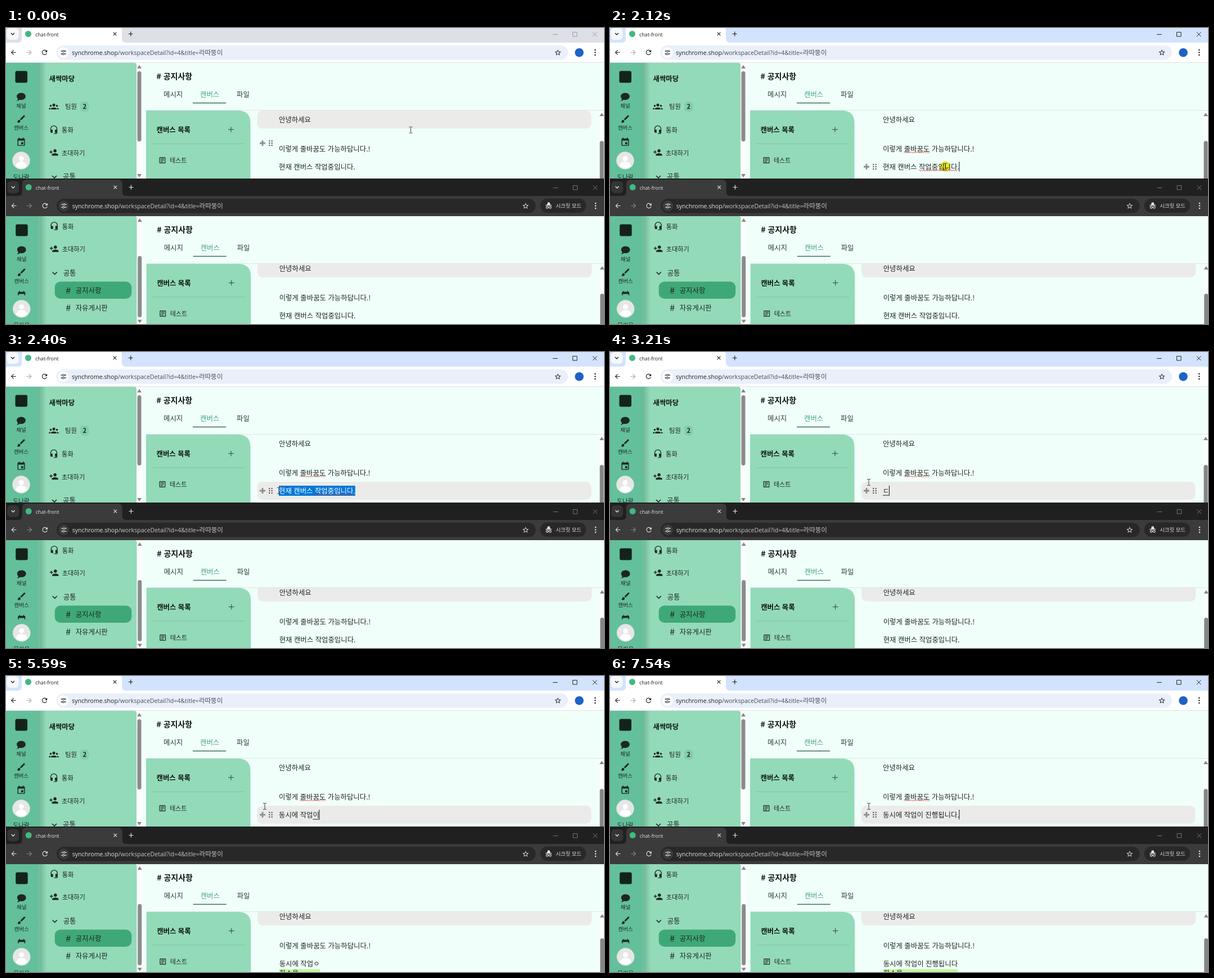
An HTML page for the animation above (8000 ms loop, 1063 by 527 pixels).

```html
<!DOCTYPE html>
<html lang="ko">
<head>
<meta charset="utf-8">
<title>chat-front</title>
<style>
html, body { margin: 0; width: 100%; height: 100%; overflow: hidden; background: #f1fffa; }
svg { display: block; width: 1063px; height: 527px; }
text { font-family: "Noto Sans CJK KR", "Noto Sans KR", "Noto Sans CJK JP", sans-serif; white-space: pre; }
.ui { font-family: "Open Sans", "Noto Sans", sans-serif; }
.mul { mix-blend-mode: multiply; }
</style>
</head>
<body>
<svg id="stage" viewBox="0 0 1063 527" xmlns="http://www.w3.org/2000/svg"></svg>
<script>
const LOOP = 8000, SIZE = 12.4, INK = '#1d2623', MINT = '#93dab9';
const OLD = '현재 캔버스 작업중입니다.';

const ICON = {
  back: 'M20 11H7.83l5.59-5.59L12 4l-8 8 8 8 1.41-1.41L7.83 13H20v-2z',
  reload: 'M17.65 6.35A8 8 0 1 0 19.73 14h-2.08A6 6 0 1 1 12 6c1.66 0 3.14.69 4.22 1.78L13 11h7V4l-2.35 2.35z',
  chat: 'M12 3C6.5 3 2 6.58 2 11c0 2.13 1.05 4.07 2.75 5.5 0 .6-.42 2.17-2.75 4.5 2.37-.11 4.64-1 6.47-2.5 1.14.33 2.34.5 3.53.5 5.5 0 10-3.58 10-8s-4.5-8-10-8',
  brush: 'M7 14c-1.66 0-3 1.34-3 3 0 1.31-1.16 2-2 2 .92 1.22 2.49 2 4 2 2.21 0 4-1.79 4-4 0-1.66-1.34-3-3-3zm13.71-9.37l-1.34-1.34c-.39-.39-1.02-.39-1.41 0L9 12.25 11.75 15l8.96-8.96c.39-.39.39-1.02 0-1.41z',
  event: 'M17 12h-5v5h5v-5zM16 1v2H8V1H6v2H5c-1.11 0-2 .9-2 2v14c0 1.1.89 2 2 2h14c1.1 0 2-.9 2-2V5c0-1.1-.9-2-2-2h-1V1h-2zm3 18H5V8h14v11z',
  headset: 'M12 1a9 9 0 0 0-9 9v7a3 3 0 0 0 3 3h3v-8H5v-2a7 7 0 0 1 14 0v2h-4v8h4v1h-7v2h6a3 3 0 0 0 3-3V10a9 9 0 0 0-9-9z',
  invite: 'M15 12c2.21 0 4-1.79 4-4s-1.79-4-4-4-4 1.79-4 4 1.79 4 4 4zm-9-2V7H4v3H1v2h3v3h2v-3h3v-2H6zm9 4c-2.67 0-8 1.34-8 4v2h16v-2c0-2.66-5.33-4-8-4z',
  team: 'M8.5 8a3.5 3.5 0 1 0 7 0a3.5 3.5 0 1 0-7 0M5 19v-1.5c0-2 3.1-3.5 7-3.5s7 1.5 7 3.5V19zM2 10a2.5 2.5 0 1 0 5 0a2.5 2.5 0 1 0-5 0M17 10a2.5 2.5 0 1 0 5 0a2.5 2.5 0 1 0-5 0M0 19v-1.5c0-1.4 1.9-2.6 4.5-2.9-.6.7-1 1.7-1 2.7V19zM24 19v-1.5c0-1.4-1.9-2.6-4.5-2.9.6.7 1 1.7 1 2.7V19z',
  note: 'M5 3h14a2 2 0 0 1 2 2v14a2 2 0 0 1-2 2H5a2 2 0 0 1-2-2V5a2 2 0 0 1 2-2zM5 5v14h14V5zM7 7h10v2H7zM7 11h10v2H7zM7 15h7v2H7z',
  star: 'M22 9.24l-7.19-.62L12 2 9.19 8.63 2 9.24l5.46 4.73L5.82 21 12 17.27 18.18 21l-1.63-7.03L22 9.24zM12 15.4l-3.76 2.27 1-4.28-3.32-2.88 4.38-.38L12 6.1l1.71 4.04 4.38.38-3.32 2.88 1 4.28L12 15.4z'
};

const icon = (name, cx, cy, size, fill = INK, flip = 1) =>
  `<path d="${ICON[name]}" fill="${fill}" fill-rule="${name === 'note' || name === 'star' ? 'evenodd' : 'nonzero'}" transform="translate(${cx} ${cy}) scale(${flip * size / 24} ${size / 24}) translate(-12 -12)"/>`;
const box = (x, y, w, h, fill, r = 0, more = '') =>
  `<rect x="${x}" y="${y}" width="${w}" height="${h}" rx="${r}" fill="${fill}" ${more}/>`;
const dot = (x, y, r, fill, more = '') => `<circle cx="${x}" cy="${y}" r="${r}" fill="${fill}" ${more}/>`;
const line = (d, color, w = 1, more = '') => `<path d="${d}" fill="none" stroke="${color}" stroke-width="${w}" ${more}/>`;
// Hangul text, placed by its vertical middle
const txt = (x, mid, s, size = SIZE, fill = INK, weight = 400, more = '') =>
  `<text x="${x}" y="${mid + size * .37}" font-size="${size}" fill="${fill}" font-weight="${weight}" ${more}>${s}</text>`;
const cross = (x, y, r, color, w) => line(`M${x - r} ${y}h${2 * r}M${x} ${y - r}v${2 * r}`, color, w);
const ex = (x, y, r, color) => line(`M${x - r} ${y - r}l${2 * r} ${2 * r}m0 ${-2 * r}l${-2 * r} ${2 * r}`, color, 1.1);
const chevron = (x, y, r, color, w) => line(`M${x - r} ${y - r / 2}l${r} ${r}l${r} ${-r}`, color, w);
const arrow = (x, y, up) => `<path d="M${x - 4} ${y + 3 * up}h8l-4 ${-6 * up}z" fill="#858585"/>`;
const wave = (x, y, w) => line(`M${x} ${y}q1 -2.4 2 0` + 't2 0'.repeat(Math.round(w / 2) - 1), '#e2382f', .9);
const grip = y => [201, 205, 209].map(v => dot(468.3, v - 205 + y, 1.2, '#555b58') + dot(472.7, v - 205 + y, 1.2, '#555b58')).join('');

function browser(c, id) {
  const pillEnd = c.dark ? 941 : 999, starX = c.dark ? 923 : 981;
  let s = box(-2, -5, 1066, 32, c.bar, 0, `id="bar${id}"`);
  s += box(1.5, 0, 21, 21, c.drop, 6) + chevron(12, 10.5, 3, c.fg, 1.4);
  s += `<path d="M21 26q7 0 7-7V5q0-8 8-8H198q8 0 8 8V19q0 7 7 7z" fill="${c.tool}"/>`;
  s += dot(39.5, 10.5, 5.5, '#41b883');
  s += `<text class="ui" x="52" y="15.3" font-size="9.05" fill="${c.fg}">chat-front</text>`;
  s += ex(193.5, 10.5, 2.8, c.fg) + cross(221.7, 10.5, 4, c.fg, 1.2);
  s += `<g id="ctl${id}" stroke="${c.ctl}" fill="none"><path d="M972 11.5h8.5M1007.500 7.500h7.500v7.500h-7.500zM1043 7.500l7.500 7.500m0-7.500l-7.500 7.500"/></g>`;
  s += box(-2, 26, 1066, 36, c.tool);
  s += icon('back', 13.3, 43.5, 13.5, c.fg) + icon('back', 41, 43.5, 13.5, c.off, -1) + icon('reload', 68.5, 43.5, 14, c.fg);
  s += box(89.5, 31, pillEnd - 89.5, 25.5, c.pill, 12.7) + dot(102, 43.7, 9.5, c.tune);
  s += line('M97.500 41.200h3.500M104 41.200h3M97.500 46.200h2.500M103 46.200h4', c.fg, 1.2);
  s += dot(102.7, 41.2, 1.6, 'none', `stroke="${c.fg}"`) + dot(101.3, 46.2, 1.6, 'none', `stroke="${c.fg}"`);
  s += `<text class="ui" x="117" y="47.5" font-size="10.6" fill="${c.fg}">synchrome.shop<tspan fill="${c.path}">/workspaceDetail?id=4&amp;title=<tspan font-size="11.5" font-weight="300" font-family="Noto Sans CJK KR, sans-serif">라따뚱이</tspan></tspan></text>`;
  s += icon('star', starX, 43.8, 13.5, c.fg);
  if (c.dark) {
    s += box(949, 30.5, 81.500, 25.500, '#282828', 12.700);
    s += `<path d="M961 42l1.200-4.500h3.600l1.200 4.500z" fill="${c.fg}"/>` + line('M958.500 42.600h11', c.fg, 1.2);
    s += [961.3, 966.7].map(x => dot(x, 46.4, 1.8, 'none', `stroke="${c.fg}" stroke-width="1.1"`)).join('') + line('M963 46h2', c.fg);
    s += txt(976.500, 43.200, '시크릿 모드', 9.4, c.fg, 500);
  } else s += dot(1019, 43.7, 7.8, '#1d62c4');
  return s + [39, 43.5, 48].map(y => dot(1047.3, y, 1.3, c.fg)).join('');
}

function page(c, id) {
  let s = box(-2, 61.5, 1066, 270, '#f1fffa');
  // folder panel
  s += `<path d="M58 62H228q4 0 4 4V340H58z" fill="${MINT}"/>`;
  s += `<g clip-path="url(#page)"><g transform="translate(0 ${c.side})">`;
  s += txt(76.5, 90, '새싹마당', SIZE, '#0c1411', 700);
  s += icon('team', 85, 140, 17.5) + txt(105, 140, '팀원', 11.3) + box(132, 131, 15.5, 18, '#84cdab', 6) + txt(139.7, 140, '2', 11, INK, 700, 'text-anchor="middle"');
  s += icon('headset', 85, 181, 16.5) + txt(99, 182, '통화', 11.3);
  s += icon('invite', 85, 221.5, 17) + txt(99, 222.5, '초대하기', 11.2);
  s += chevron(86, 265, 4, INK, 1.6) + txt(101, 264.5, '공통');
  s += box(86, 280, 136.5, 30.5, '#3fa878', 10);
  s += txt(105.5, 295.5, '#', 16) + txt(123, 295.5, '공지사항') + txt(105.5, 326.5, '#', 16) + txt(123, 326.5, '자유게시판');
  s += '</g></g>';
  s += box(232, 62, 10, 280, '#fcfcfc') + arrow(237, 69, 1) + arrow(237, c.downY, -1) + box(233.5, c.thumb[0], 7, c.thumb[1], '#8b8b8b', 3.5);
  // icon rail
  s += box(58, 62, 14, 280, 'url(#shade)') + box(-2, 62, 60, 280, '#63c09a');
  s += box(16.500, 76.500, 21.500, 21, '#13231c', 3);
  s += icon('chat', 27, 122.500, 19) + icon('brush', 27, 162, 18);
  s += txt(27, 138, '채널', 9.6, INK, 400, 'text-anchor="middle"') + txt(27, 177.5, '캔버스', 9.5, INK, 400, 'text-anchor="middle"');
  s += icon('event', 27, 203.300, 17.500) + box(0, c.face - 24, 57, 90, '#63c09a', 0, c.dark ? '' : 'opacity="0"');
  s += dot(27, c.face, 15.700, '#e6e6e6') + dot(27, c.face - 3.5, 4.6, '#fff');
  s += `<path d="M17.500 ${c.face + 10}q0-8 9.500-8t9.500 8q-9.500 8-19 0" fill="#fff"/>`;
  s += txt(27, c.face + 29, c.user, 10.5, INK, 400, 'text-anchor="middle"');
  // header
  s += txt(267.5, 85.5, '# 공지사항', 14, '#0c1411', 700);
  s += txt(280, 118, '메시지', SIZE, '#2d3a35') + txt(345, 118, '캔버스', SIZE, '#45a37e', 500) + txt(410, 118, '파일', SIZE, '#2d3a35');
  s += line('M332 133.500H391', '#3f6d5a', 1.3) + line('M249 146.500H1064', '#d9e6e0');
  // canvas list
  s += `<path d="M249 147H412q22.500 0 22.500 22.500V340H249z" fill="${MINT}"/>`;
  s += txt(267.5, 181, '캔버스 목록', SIZE, '#0c1411', 700) + cross(400, 180.7, 4.8, '#3d5a4e', 1.2);
  s += line('M260 206H424.500', '#7fc3a4') + icon('note', 278, 235.5, 14.5) + txt(291, 236, '테스트', 11, INK, 500);
  // editor
  s += box(1055, 147, 9, 200, '#fbfdfc') + arrow(1059, 154, 1) + box(1055.5, c.bar2, 7, 200, '#858585', 3.5, `id="thumb${id}"`);
  s += `<g clip-path="url(#editor)"><g transform="translate(0 ${c.scroll})">`;
  s += box(446.5, 147, 594, 32, '#ebebea', 9, `id="hello${id}"`);
  if (!c.dark) {
    s += box(446.5, 231, 594, 32, '#ebebea', 9, 'id="focus"');
    s += `<g id="plusA">${cross(456, 205, 5, '#8b918e', 2.8)}</g><g id="plusB">${cross(456, 247, 5, '#8b918e', 2.8)}</g>`;
    s += `<g id="gripA">${grip(205)}</g><g id="gripB">${grip(247)}</g>`;
    s += box(485, 238, 0, 18, '#0078d7', 0, 'id="sel"');
  } else s += box(485.300, 257, 0, 18, '#c0f99b', 0, 'id="tag"') + txt(485.300, 264.500, '한소울', SIZE, INK, 400, 'id="peer"');
  s += txt(485, 163, '안녕하세요') + txt(485, 215, '이렇게 줄바꿈도 가능하답니다.!') + txt(485, 247, OLD, SIZE, INK, 400, `id="text${id}"`);
  if (!c.dark) {
    s += `<g id="waveA">${wave(522.5, 221.5, 45)}</g><g id="waveB">${wave(549, 253.5, 68)}</g>`;
    s += box(485, 254.6, 10, 1, INK, 0, 'id="under"') + box(620, 238, 1, 17.5, '#111', 0, 'id="caret"');
  }
  return s + '</g></g>';
}

const light = { bar: '#dde1e7', drop: '#f6f8fa', tool: '#fff', fg: '#1f2123', off: '#a5a8ab', path: '#4b4f53', ctl: '#979ba0',
  pill: '#e9f0fa', tune: '#fff', side: 0, downY: 263, thumb: [77, 125], face: 236, user: '도나람', bar2: 201, scroll: 0 };
const dark = { dark: true, bar: '#202021', drop: '#353535', tool: '#3b3b3b', fg: '#e2e2e2', off: '#858585', path: '#c4c4c4', ctl: '#777',
  pill: '#282828', tune: '#3b3b3b', side: -101.5, downY: 249.5, thumb: [133, 109], face: 227, user: '문가온', bar2: 200, scroll: -8 };

const $ = id => document.getElementById(id);
$('stage').innerHTML = `<defs>
  <clipPath id="page"><rect x="0" y="62" width="232" height="280"/></clipPath>
  <clipPath id="editor"><rect x="436" y="147" width="618" height="200"/></clipPath>
  <linearGradient id="shade"><stop offset="0" stop-color="#2f7a5a" stop-opacity=".38"/><stop offset="1" stop-color="#2f7a5a" stop-opacity="0"/></linearGradient>
  </defs><g>${page(light, 0)}${browser(light, 0)}${line('M0 61.500H1063', '#dbe3e0')}</g>
  ${box(0, 268, 1063, 259, '#202021')}
  <g transform="translate(.7 273)">${page(dark, 1)}${browser(dark, 1)}</g>
  ${dot(0, 0, 9.3, '#f7e52c', 'id="click" class="mul" opacity=".9"')}
  <g id="mouse">${line('M-3-5.500h2l1 .8 1-.8h2M0-4.700V4.700M-3 5.500h2l1-.8 1 .8h2', '#39413d')}</g>`;

// each move: first step, last step, number of steps, end point
const moves = [[180, 920, 11, 651, 223], [990, 1190, 4, 662, 227], [1260, 1395, 3, 647, 235], [1460, 1720, 5, 622, 247],
  [2120, 2200, 2, 570, 246], [2270, 2400, 3, 485, 247], [2730, 2930, 3, 460, 232]];
const typed = [[0, OLD], [3210, 'ㄷ'], [3540, '도'], [3740, '동'], [3840, '동ㅅ'], [4000, '동시'], [4130, '동시ㅇ'], [4330, '동시에'],
  [4570, '동시에 '], [4680, '동시에 ㅈ'], [4790, '동시에 자'], [4890, '동시에 작'], [4990, '동시에 작ㅇ'], [5130, '동시에 작어'],
  [5450, '동시에 작업ㅇ'], [5590, '동시에 작업이'], [5720, '동시에 작업이 '], [5870, '동시에 작업이 ㅈ'], [6060, '동시에 작업이 지'],
  [6160, '동시에 작업이 진'], [6400, '동시에 작업이 진ㅎ'], [6470, '동시에 작업이 진해'], [6670, '동시에 작업이 진행'],
  [6750, '동시에 작업이 진행ㄷ'], [6840, '동시에 작업이 진행되'], [6920, '동시에 작업이 진행됩'], [7000, '동시에 작업이 진행됩ㄴ'],
  [7080, '동시에 작업이 진행됩니'], [7170, '동시에 작업이 진행됩니ㄷ'], [7250, '동시에 작업이 진행됩니다'], [7540, '동시에 작업이 진행됩니다.']];
const synced = [[0, OLD], [3930, '동'], [4460, '동시에'], [5190, '동시에 작ㅇ'], [5590, '동시에 작업ㅇ'], [5720, '동시에 작업이'],
  [5970, '동시에 작업이 ㅈ'], [6250, '동시에 작업이 진'], [6750, '동시에 작업이 진행'], [7080, '동시에 작업이 진행됩'],
  [7330, '동시에 작업이 진행됩니'], [7410, '동시에 작업이 진행됩니다']];
const picked = [[0, OLD.length], [2270, 9], [2330, 4], [2400, 0], [3210, 99]];

const at = (list, t) => list.reduce((v, [from, val]) => t >= from ? val : v, list[0][1]);
const show = (id, on) => $(id).setAttribute('opacity', +on);
const set = (id, key, val) => $(id).setAttribute(key, val);

function mouseAt(t) {
  let x = 719.5, y = 181.5;
  for (const [a, b, n, x1, y1] of moves) {
    if (t < a) break;
    const k = Math.min(n, Math.floor((t - a) / (b - a) * (n - 1) + 1.001)) / n;
    x += (x1 - x) * k;
    y += (y1 - y) * k;
  }
  return [x, y];
}

function write(id, s) {
  const el = $(id);
  if (el.textContent !== s) el.textContent = s;
  return el.getComputedTextLength();
}

function draw(t) {
  const active = t >= 2120, typing = t >= 3210, shared = t >= 3930;
  const [x, y] = mouseAt(t);
  set('mouse', 'transform', `translate(${x} ${y})`);
  set('click', 'transform', `translate(${x} ${y})`);
  show('click', active && t < 2400);

  set('bar0', 'fill', active ? '#d3e3fd' : light.bar);
  set('ctl0', 'stroke', active ? '#222' : light.ctl);
  show('hello0', !active);
  show('focus', t >= 2400);
  show('waveA', active);
  show('waveB', active && !typing);

  const fade = Math.min(1, Math.max(0, (t - 1310) / 300));
  show('plusA', 1 - fade);
  show('plusB', fade);
  show('gripA', t < 1320);
  show('gripB', t >= 1320);

  const s = at(typed, t), el = $('text0'), w = write('text0', s);
  const from = at(picked, t), selecting = from < s.length && !typing;
  const start = selecting && from ? el.getSubStringLength(0, from) : 0;
  set('sel', 'x', 485 + start);
  set('sel', 'width', selecting ? w - start : 0);
  if (selecting) el.innerHTML = s.slice(0, from) + `<tspan fill="#fff">${s.slice(from)}</tspan>`;
  else if (el.firstElementChild) el.textContent = s;

  show('caret', active && !selecting);
  set('caret', 'x', 485 + w - .5);
  const composing = typing && !/[ .]$/.test(s);
  show('under', composing);
  if (composing) {
    const last = el.getSubStringLength(s.length - 1, 1);
    set('under', 'x', 485 + w - last);
    set('under', 'width', last);
  }

  const remote = write('text1', at(synced, t));
  show('peer', shared);
  set('tag', 'width', shared ? Math.max(remote, $('peer').getComputedTextLength()) : 0);
  set('thumb1', 'y', shared ? 194 : dark.bar2);
}

function tick() {
  draw(performance.now() % LOOP);
  requestAnimationFrame(tick);
}
tick();
</script>
</body>
</html>
```
